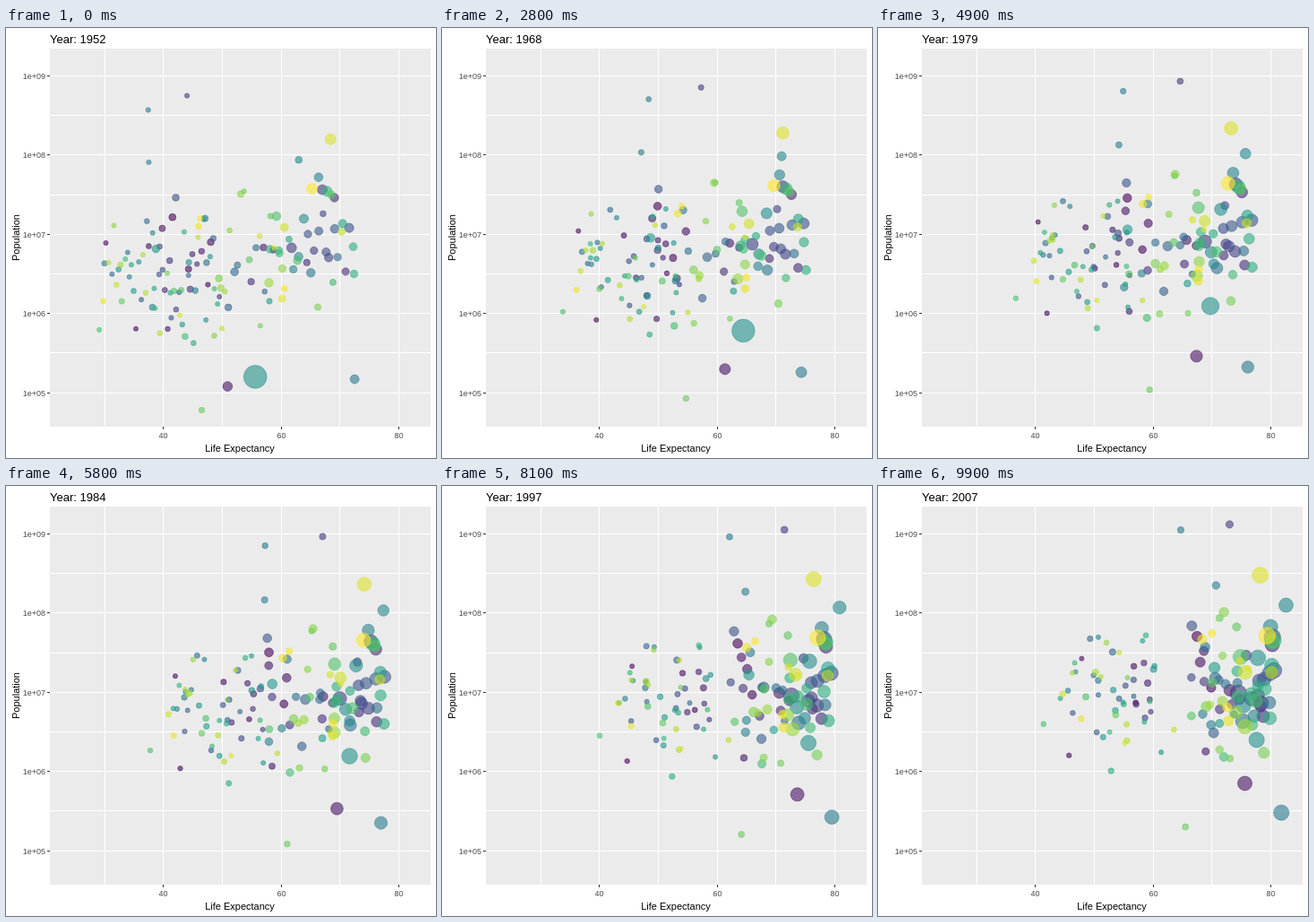
Recreate the animation shown at these times as an HTML page. Size 480 by 480 pixels, loop 10000 ms.

```html
<!DOCTYPE html>
<html lang="en">
<head>
<meta charset="utf-8">
<title>Life expectancy and population</title>
<style>
  html, body { margin: 0; width: 100%; height: 100%; overflow: hidden; background: #fff; }
  svg { display: block; width: 100%; height: 100%; }
  text { font-family: "Liberation Sans", Arial, sans-serif; font-size: 11px; }
  .tick { font-size: 9px; fill: #4d4d4d; }
  .title { font-size: 13px; }
  line { stroke-width: 1; shape-rendering: crispEdges; }
</style>
</head>
<body>
<svg viewBox="0 0 480 480">
  <rect x="49" y="23" width="425" height="422" fill="#ebebeb"/>
  <g id="axes"></g>
  <g id="dots"></g>
  <text id="year" class="title" x="49" y="17"></text>
  <text x="261" y="473" text-anchor="middle">Life Expectancy</text>
  <text transform="translate(15 234) rotate(-90)" text-anchor="middle">Population</text>
</svg>
<script>
const FRAMES = 100, STEP = 100, COUNT = 142;
const axes = document.getElementById('axes');
const dotLayer = document.getElementById('dots');
const yearText = document.getElementById('year');

const px = life => 175.8 + (life - 40) * 6.565;
const py = logPop => 407.1 - (logPop - 5) * 88.4;
const mix = (a, b, t) => a + (b - a) * t;
const clamp = (v, lo, hi) => Math.min(hi, Math.max(lo, v));

function add(parent, tag, attrs, text) {
  const el = document.createElementNS('http://www.w3.org/2000/svg', tag);
  for (const key in attrs) el.setAttribute(key, attrs[key]);
  if (text) el.textContent = text;
  return parent.appendChild(el);
}

const rule = (x1, y1, x2, y2, stroke) => add(axes, 'line', { x1, y1, x2, y2, stroke });
const snap = v => Math.floor(v) + 0.5;

function drawAxes() {
  for (let life = 30; life <= 80; life += 10) {
    const x = snap(px(life));
    rule(x, 23, x, 445, '#fff');
    if (life % 20) continue;
    rule(x, 445, x, 448, '#333');
    add(axes, 'text', { x, y: 458, class: 'tick', 'text-anchor': 'middle' }, String(life));
  }
  for (let p = 5; p <= 9; p += 0.5) {
    const y = snap(py(p));
    rule(49, y, 474, y, '#fff');
    if (p % 1) continue;
    rule(46, y, 49, y, '#333');
    add(axes, 'text', { x: 44, y: y + 3.5, class: 'tick', 'text-anchor': 'end' }, '1e+0' + p);
  }
}

// Viridis ramp, sampled by rank
const RAMP = ['440154', '482878', '3e4a89', '31688e', '26828e', '1f9e89', '35b779', '6dcd59', 'b4de2c', 'fde725'];
function colour(rank) {
  const pos = (rank - 1) / (COUNT - 1) * (RAMP.length - 1);
  const i = Math.min(Math.floor(pos), RAMP.length - 2);
  const part = (hex, k) => parseInt(hex.slice(k, k + 2), 16);
  const rgb = [0, 2, 4].map(k => Math.round(mix(part(RAMP[i], k), part(RAMP[i + 1], k), pos - i)));
  return `rgb(${rgb})`;
}

// Dots that stand apart: [start, end] pairs, bow lifts the middle of the life path
const LANDMARKS = [
  { rank: 25, life: [44, 73], bow: 25, pop: [8.75, 9.12], r: [2.7, 4.2] },
  { rank: 59, life: [37.4, 64.7], bow: 16, pop: [8.57, 9.05], r: [2.7, 3.7] },
  { rank: 60, life: [37.5, 70.7], bow: 1, pop: [7.91, 8.35], r: [2.7, 4.3] },
  { rank: 135, life: [68.4, 78.2], bow: 0, pop: [8.2, 8.48], r: [6.1, 9] },
  { rank: 67, life: [63, 82.6], bow: 12, pop: [7.94, 8.1], r: [3.9, 8] },
  { rank: 58, life: [72.5, 81.8], bow: -4, pop: [5.17, 5.48], r: [5, 8.6] },
  { rank: 8, life: [50.9, 75.6], bow: 17, pop: [5.08, 5.85], r: [5.4, 8] },
  { rank: 109, life: [46.5, 65.5], bow: 14, pop: [4.78, 5.3], r: [3.2, 3.5] }
];

// Seeded crowds: ranges of life at start and end, mean and spread of log population
const CROWDS = [
  { n: 6, from: [65, 69.5], to: [79, 81], bow: 2, pop: 7.6, spread: 0.25, growth: 0.13, r: [5, 8.3] },
  { n: 32, from: [57, 72.8], to: [73, 81], bow: 3, pop: 6.7, spread: 0.7, growth: 0.17, r: [4.4, 7.5] },
  { n: 40, from: [38, 61], to: [65, 77], bow: 5, pop: 6.6, spread: 0.9, growth: 0.47, r: [3.4, 4.9] },
  { n: 55, from: [29, 50], to: [40, 65], bow: 6, pop: 6.5, spread: 0.9, growth: 0.54, r: [2.7, 3] }
];

let seed = 1952;
function rand() {
  seed = (seed * 1664525 + 1013904223) % 4294967296;
  return seed / 4294967296;
}
const bell = () => rand() + rand() + rand() - 1.5;

const pathOf = ({ life, bow, pop, r }) => t => ({
  life: mix(...life, t) + bow * t * (1 - t),
  pop: mix(...pop, t),
  r: mix(...r, t)
});

// The widest dot holds its size, then shrinks halfway through
const widest = t => ({
  life: mix(55.6, 77.6, t) + 13 * t * (1 - t),
  pop: mix(5.2, 6.4, t) + 1.2 * t * (1 - t),
  r: 8.6 + 4.3 / (1 + Math.exp((t - 0.45) * 22))
});

function makeDots() {
  const dots = LANDMARKS.map(m => ({ rank: m.rank, at: pathOf(m) }));
  dots.push({ rank: 72, at: widest });

  const taken = new Set(dots.map(d => d.rank));
  const free = [];
  for (let k = 1; k <= COUNT; k++) if (!taken.has(k)) free.push(k);

  for (const c of CROWDS) {
    for (let j = 0; j < c.n; j++) {
      const rank = free.splice(Math.floor(rand() * free.length), 1)[0];
      const u = (j + rand()) / c.n;
      const v = mix(u, rand(), 0.45);
      const pop = c.pop + c.spread * bell();
      const size = 1 + 0.25 * bell();
      dots.push({ rank, at: pathOf({
        life: [mix(...c.from, u), mix(...c.to, v)],
        bow: c.bow,
        pop: [pop, pop + c.growth * (1 + 0.4 * bell())],
        r: c.r.map(r => clamp(r * size, 2.6, 9.4))
      }) });
    }
  }
  return dots.sort((a, b) => a.rank - b.rank);
}

drawAxes();
const dots = makeDots();
for (const d of dots) {
  const paint = colour(d.rank);
  d.el = add(dotLayer, 'circle', {
    fill: paint, stroke: paint, 'fill-opacity': 0.6, 'stroke-opacity': 0.6, 'stroke-width': 0.8
  });
}

function render(frame) {
  const t = frame / (FRAMES - 1);
  yearText.textContent = 'Year: ' + Math.round(1952 + 55 * t);
  for (const d of dots) {
    const s = d.at(t);
    d.el.setAttribute('cx', px(s.life).toFixed(2));
    d.el.setAttribute('cy', py(s.pop).toFixed(2));
    d.el.setAttribute('r', s.r.toFixed(2));
  }
}

const start = performance.now();
let shown = -1;
function tick() {
  const frame = Math.floor((performance.now() - start) / STEP) % FRAMES;
  if (frame !== shown) render(shown = frame);
  requestAnimationFrame(tick);
}
tick();
</script>
</body>
</html>
```
